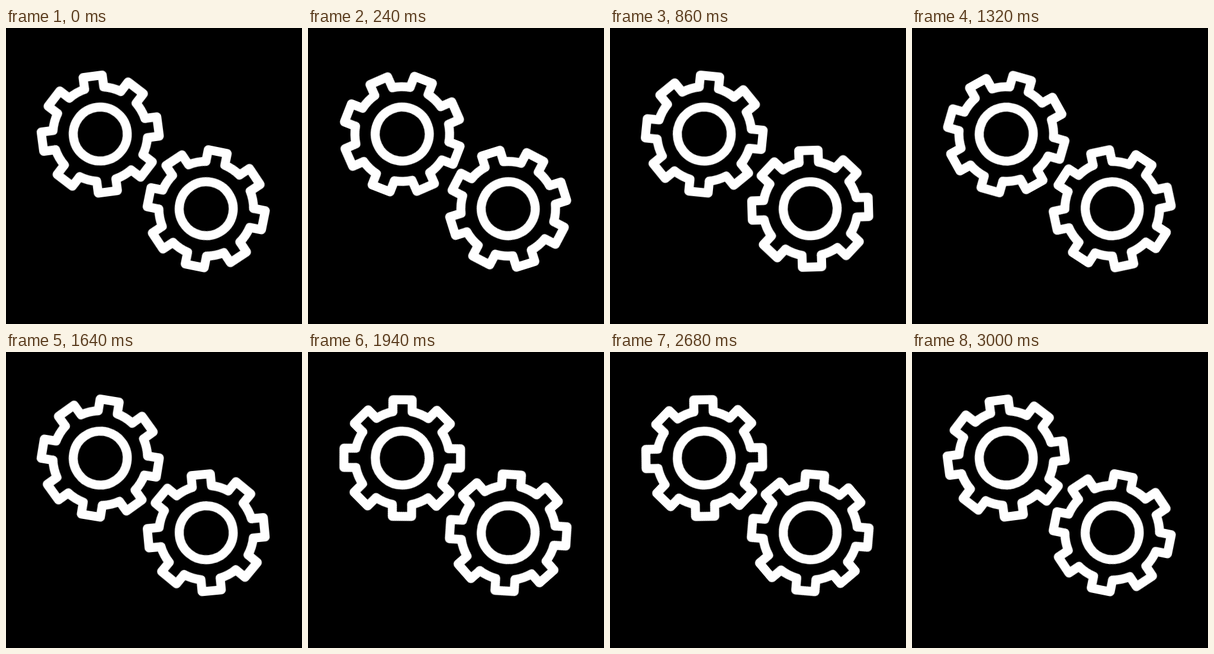
An HTML page that plays this animation: 500 px wide and 500 px high, repeating every 3.02 s.

```html
<!DOCTYPE html>
<html lang="en">
<head>
<meta charset="utf-8">
<title>Gears</title>
<style>
  html, body { margin: 0; width: 100%; height: 100%; overflow: hidden; background: #000; }
  svg { display: block; width: 100%; height: 100%; }
  .gear { fill: none; stroke: #fff; stroke-width: 15.2; stroke-linecap: round; stroke-linejoin: round; }
  /* 150 steps of 2.4deg make one turn; the last step holds the starting pose */
  .spin { transform-origin: 0 0; animation: turn 3.02s steps(151) -2ms infinite; }
  .back { animation-name: turn-back; }
  @keyframes turn { from { transform: rotate(0deg); } to { transform: rotate(362.4deg); } }
  @keyframes turn-back { from { transform: rotate(0deg); } to { transform: rotate(-362.4deg); } }
</style>
</head>
<body>
<svg viewBox="0 0 500 500">
  <defs>
    <path id="tooth" d="M-16.3 -78.3V-98.5H16.3V-78.3A80 80 0 0 1 43.85 -66.91"/>
    <g id="pair"><use href="#tooth"/><use href="#tooth" transform="rotate(45)"/></g>
    <g id="half"><use href="#pair"/><use href="#pair" transform="rotate(90)"/></g>
    <g id="gear">
      <use href="#half"/><use href="#half" transform="rotate(180)"/>
      <circle r="45.6"/>
    </g>
  </defs>
  <g class="gear" transform="translate(159.2 179.2)">
    <g class="spin"><use href="#gear" transform="rotate(-7.5)"/></g>
  </g>
  <g class="gear" transform="translate(338.2 305.3)">
    <g class="spin back"><use href="#gear" transform="rotate(11.4)"/></g>
  </g>
</svg>
</body>
</html>
```
